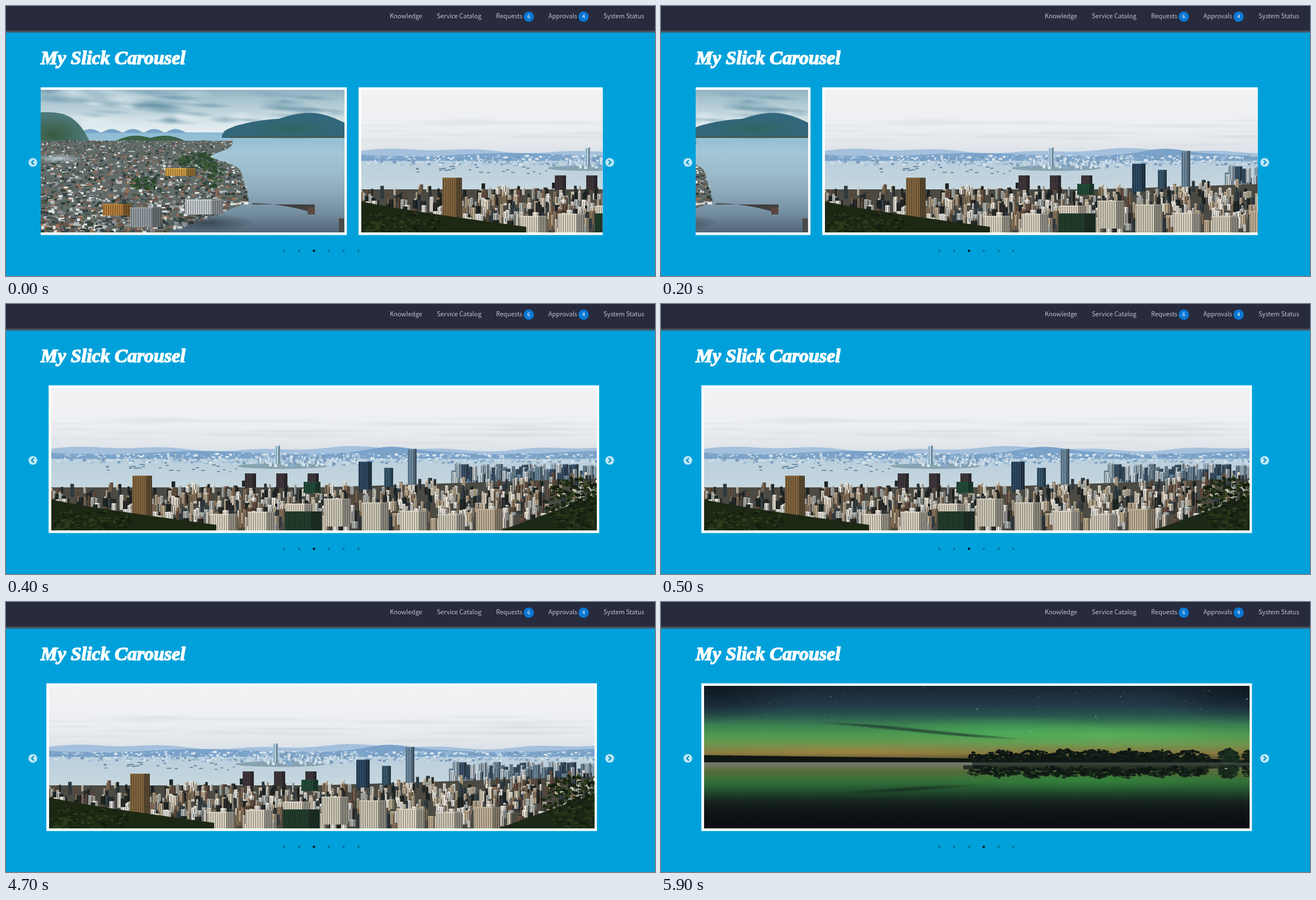
An HTML page with a canvas for the animation above (6.9 s loop, 1160 by 483 pixels).

```html
<!DOCTYPE html>
<html lang="en">
<head>
<meta charset="utf-8">
<title>My Slick Carousel</title>
<style>
  html, body { margin: 0; width: 100%; height: 100%; overflow: hidden; background: #00a1db; }
  canvas, svg { position: absolute; left: 0; top: 0; }
  .nav { font: 11.1px "Noto Sans CJK JP", "Noto Sans CJK SC", "Noto Sans CJK", sans-serif; fill: #c0c4cb; }
  .badge { font-size: 9.5px; fill: #fff; text-anchor: middle; }
  .title { font: italic bold 34px "Liberation Serif", serif; fill: #fff; stroke: #fff; stroke-width: 1.6; stroke-linejoin: round; }
</style>
</head>
<body>
<canvas id="stage" width="1160" height="483"></canvas>
<svg width="1160" height="483">
  <rect width="1160" height="44" fill="#272b3d"/>
  <rect y="44" width="1160" height="3.5" fill="#4a525e"/>
  <g class="nav">
    <text x="686" y="22">Knowledge</text>
    <text x="770" y="22">Service Catalog</text>
    <text x="876" y="22">Requests</text>
    <text x="969.5" y="22">Approvals</text>
    <text x="1068" y="22">System Status</text>
    <g fill="#0a78d4"><circle cx="934.4" cy="18.9" r="9.2"/><circle cx="1032.4" cy="18.9" r="9.2"/></g>
    <text class="badge" x="934.3" y="22">6</text>
    <text class="badge" x="1032.3" y="22">4</text>
  </g>
  <text class="title" x="62" y="104">My Slick Carousel</text>
  <g fill="#bfe8f6"><circle cx="48" cy="279.7" r="7.8"/><circle cx="1079" cy="279.7" r="7.8"/></g>
  <path d="M50 275.7l-4.2 4 4.2 4M1077 275.7l4.2 4-4.2 4" fill="none" stroke="#0f93c2" stroke-width="2.4"/>
  <g id="dots"></g>
  <path id="cursor" d="M12 35v14.4l3.4-3 2.4 5.2 2.6-1.2-2.4-5h4.2z" fill="#fff" stroke="#111" stroke-width="1.2"/>
</svg>
<script>
const LOOP = 6900, PITCH = 1005.2;
const { sin, cos, abs, max, sqrt, exp, PI } = Math;
let g, seed = 7;
const rand = (a = 0, b = 1) => {
  seed = (seed * 1664525 + 1013904223) % 4294967296;
  return a + (b - a) * seed / 4294967296;
};
const pick = list => list[Math.floor(rand(0, list.length))];
const repeat = (n, fn) => { for (let i = 0; i < n; i++) fn(i / n); };

// Photos are painted in the stage coordinates of a centred slide.
const LEFT = 77, TOP = 150, WIDTH = 975, HEIGHT = 255, RIGHT = LEFT + WIDTH, BOTTOM = TOP + HEIGHT;
function photo(paint) {
  const c = document.createElement('canvas');
  c.width = WIDTH;
  c.height = HEIGHT;
  g = c.getContext('2d');
  g.translate(-LEFT, -TOP);
  paint();
  return c;
}
function box(color, x, y, w, h) {
  g.fillStyle = color;
  g.fillRect(x, y, w, h);
}
function band(y0, y1, ...colors) {
  const fill = g.createLinearGradient(0, y0, 0, y1);
  colors.forEach((color, i) => fill.addColorStop(i / (colors.length - 1), color));
  box(fill, LEFT, y0, WIDTH, y1 - y0);
}
function ridge(color, x0, x1, base, top) {
  g.beginPath();
  g.moveTo(x0, base);
  for (let u = 0; u <= 1; u += 1 / 64) g.lineTo(x0 + (x1 - x0) * u, top(u));
  g.lineTo(x1, base);
  g.fillStyle = color;
  g.fill();
}
function oval(color, x, y, rx, ry) {
  g.fillStyle = color;
  g.beginPath();
  g.ellipse(x, y, rx, ry, 0, 0, 7);
  g.fill();
}
function glow(rgb, alpha, x, y, rx, ry, angle = 0) {
  g.save();
  g.translate(x, y);
  g.rotate(angle);
  g.scale(rx, ry);
  const fill = g.createRadialGradient(0, 0, 0, 0, 0, 1);
  fill.addColorStop(0, `rgba(${rgb},${alpha})`);
  fill.addColorStop(1, `rgba(${rgb},0)`);
  oval(fill, 0, 0, 1, 1);
  g.restore();
}
function foliage(n, x, y, rx, ry, colors) {
  repeat(n, () => {
    const a = rand(0, 2 * PI), d = sqrt(rand());
    oval(pick(colors), x + rx * d * cos(a), y + ry * d * sin(a), rand(2, 5), rand(1, 3));
  });
}
function tower(color, x, y, w, h) {
  box(color, x, y, w, h);
  box('rgba(15,18,20,.35)', x + w * .7, y, w * .3, h);
  for (let i = 1.5; i < w - 1; i += 4) box('rgba(20,20,20,.4)', x + i, y + 2, 1.5, h - 2);
}

const fjord = photo(() => {
  const SHIFT = 447;
  g.translate(SHIFT, 0);
  g.save();
  g.translate(-SHIFT, 0);
  band(150, 230, '#8fb2c2', '#abc6d1', '#bfd4dc', '#dce8ec', '#e6eff2');
  band(226, BOTTOM, '#8dbbd4', '#a3c6d7', '#9dbccc', '#8ca8b9', '#748fa1', '#526577');
  g.restore();
  repeat(60, () => glow(pick(['84,132,155', '238,245,247', '120,160,178']), .45,
    rand(62, 604), rand(150, 208), rand(18, 60), rand(4, 10), .06));
  ridge('#76a4c6', 132, 322, 227, u => 227 - 7 * abs(sin(5 * PI * u)));
  ridge('#33677b', 386, 640, 236, u => 231 - 30 * sqrt(sin(PI * u)) - 11 * max(0, sin(2 * PI * (u - .4))));
  glow('45,100,85', .6, 510, 220, 90, 20);
  box('#3f5b55', 400, 233, 204, 3);
  ridge('#4d7879', 62, 153, 254, u => 190 + 60 * u ** 3.5);
  glow('52,82,48', .8, 85, 230, 60, 35);
  ridge('#3b6046', 188, 328, 248, u => 245 - 9 * sin(PI * u) - 6 * abs(sin(2 * PI * u)));

  const shore = t => t < .66 ? 405 + 45 * t - 45 * exp(-(((t - .17) / .08) ** 2)) : 435 - 430 * (t - .66);
  repeat(HEIGHT, t => box('#626c69', 62, 241 + 164 * t, shore(t) - 62, 1.5));
  const walls = ['#e2e6e6', '#b4bbbd', '#8a9294', '#5c6467', '#36424a', '#96705a', '#6d554c', '#4c5a4c', '#2c3d35'];
  repeat(2400, i => {
    const t = i ** 1.2, size = .8 + 1.8 * i;
    box(pick(walls), rand(60, shore(t) - 3), 240 + 163 * t, size * rand(1.5, 4.5), size * rand(1, 2.8));
  });
  glow('190,211,221', .85, 92, 273, 50, 9);
  const leaves = ['#28442d', '#3c5a35', '#324c37'];
  foliage(90, 340, 276, 32, 14, leaves);
  foliage(50, 368, 302, 20, 22, leaves);
  foliage(50, 246, 317, 24, 12, leaves);
  tower('#d3a044', 284, 290, 55, 14);
  tower('#bb813b', 173, 354, 52, 21);
  tower('#c8d0d4', 320, 346, 68, 27);
  tower('#97a1a6', 222, 360, 56, 36);
  glow('33,40,50', .6, 360, 388, 85, 16);
  ridge('#41403f', 440, 552, 355, u => 353 + 18 * u * u);
  box('#5b4941', 539, 360, 13, 13);
  box('#49494a', 595, 380, 9, 25);
});

const harbour = photo(() => {
  band(150, 285, '#f0f2f3', '#eff1f3', '#eceef1', '#e2e6ea', '#c9d9e6');
  repeat(30, () => glow('205,211,219', .3, rand(LEFT, RIGHT), rand(202, 250), rand(60, 180), rand(2, 6)));
  ridge('#a4c0dc', LEFT, RIGHT, 282, u => 259 - 3 * sin(14 * u) - 2 * sin(37 * u));
  ridge('#7ba3ca', LEFT, RIGHT, 284, u => 266 + 3 * sin(17 * u) - 8 * exp(-(((u - .62) / .05) ** 2)));
  band(277, 345, '#b9cfdd', '#bfd2dd', '#c4d6de', '#cbd9df');
  const haze = ['#c8dae7', '#a3c0d8', '#88acce', '#dce7ee', '#7899b8'];
  repeat(700, () => box(pick(haze), rand(LEFT, RIGHT), rand(266, 283), rand(1.5, 7), rand(1, 4)));
  oval('#86a3af', 490, 290, 80, 5);
  repeat(180, () => box(pick(haze), rand(440, 625), rand(270, 286), rand(2, 6), rand(2, 7)));
  repeat(24, () => oval('#65879f', rand(150, 430), rand(286, 300), rand(2, 6), 1));
  tower('#b7dbef', 477, 253, 9, 34);
  repeat(130, () => tower(pick(['#6f8b9d', '#a5bbc8', '#3a536a', '#c7d3da']), rand(780, RIGHT), rand(285, 308), rand(5, 14), 26));

  const skyline = x => 320 - 16 * max(0, (x - 560) / (RIGHT - 560));
  ridge('#4b4a43', LEFT, RIGHT, BOTTOM, u => skyline(LEFT + WIDTH * u) + 8);
  const facades = ['#f3eee2', '#ddd2bf', '#c4b296', '#8f785e', '#ebe8e2', '#2b2d2c', '#37444a', '#b9beba', '#6b5243', '#1f2826'];
  repeat(900, depth => {
    const x = rand(LEFT - 4, RIGHT);
    tower(pick(facades), x, skyline(x) + 66 * depth + rand(-6, 9), rand(3, 7 + 7 * depth), rand(9, 22 + 20 * depth));
  });
  tower('#2d4a65', 626, 282, 24, 50);
  tower('#385a70', 672, 293, 16, 34);
  tower('#718fa5', 714, 259, 16, 64);
  for (let x = 423; x < 540; x += 56) tower('#40373d', x, 303, 20, 26);
  tower('#214d39', 528, 318, 30, 20);
  tower('#86683f', 222, 307, 35, 78);
  for (let x = 360; x < 900; x += 68) tower(pick(['#e0d8c6', '#c6b49a', '#d3cdbb']), x, 362 + 14 * sin(x), 48, 50);
  tower('#213e2c', 495, 371, 66, 34);
  const leaves = ['#17230f', '#223215', '#2d3d1d', '#141c10'];
  ridge('#1c2813', LEFT, 372, BOTTOM, u => 349 + 46 * u ** .85);
  foliage(160, 140, 387, 90, 20, leaves);
  ridge('#1d2918', 880, RIGHT, BOTTOM, u => 405 - 62 * u);
  foliage(320, 1015, 358, 55, 48, leaves);
});

const aurora = photo(() => {
  band(150, 288, '#18242f', '#1d303d', '#223a48', '#29524f', '#3a7d50', '#4d9750', '#6c9750', '#88793f', '#393a29');
  band(287, BOTTOM, '#777b69', '#546c38', '#327038', '#235030', '#17271f', '#101519', '#0e1016', '#0c0d13');
  glow('75,185,95', .5, 610, 232, 220, 28);
  glow('95,195,100', .5, 810, 238, 230, 24);
  glow('50,145,60', .5, 760, 318, 280, 20);
  glow('185,140,65', .4, 330, 267, 270, 14);
  for (const x of [LEFT, RIGHT]) glow('10,16,24', .7, x, 152, 180, 65);
  for (let x = 380; x < 600; x += 80) glow('28,48,44', .8, x, 222 + (x - 380) / 10, 110, 3.5, .07);
  glow('14,32,24', .7, 440, 335, 130, 5, -.06);
  repeat(200, i => {
    const size = rand(.5, 1.2) + (i > .94 ? 1 : 0);
    box(`rgba(205,225,238,${rand(.2, .75)})`, rand(LEFT, RIGHT), 150 + 85 * rand() ** 1.4, size, size);
  });

  const forest = () => {
    ridge('#0e1512', LEFT, 570, 287, u => 274 + 6 * u);
    ridge('#0f1714', 556, RIGHT, 291, u => 284 - 8 * sin(PI * u));
    for (let x = 562; x < 980; x += 11)
      foliage(20, x, 277 + 3 * sin(x / 9) - 3 * sin((x - 556) / 135), 12, 8, ['#101a15', '#14211a', '#0d1411']);
    foliage(120, 1014, 277, 17, 14, ['#15241a', '#1c3021']);
    foliage(30, 1048, 276, 10, 10, ['#15241a', '#101a15']);
  };
  g.save();
  g.globalAlpha = .7;
  g.translate(0, 579);
  g.scale(1, -1);
  g.beginPath();
  g.rect(540, 250, 512, 39);
  g.clip();
  forest();
  g.restore();
  forest();
  band(286, 293, 'rgba(105,115,110,.1)', 'rgba(112,122,116,.5)', 'rgba(105,115,110,0)');
  oval('#c9d9e0', 1010, 298, 3, .8);
});

// The CSS "ease" curve, cubic-bezier(.25, .1, .25, 1).
function ease(x) {
  if (x >= 1) return 1;
  let low = 0, high = 1, s;
  repeat(24, () => {
    s = (low + high) / 2;
    if (.75 * s * (1 - s) + s ** 3 < x) low = s; else high = s;
  });
  return .3 * s * (1 - s) ** 2 + 3 * s * s * (1 - s) + s ** 3;
}

const stage = document.getElementById('stage').getContext('2d');
const cursor = document.getElementById('cursor');
const dots = Array.from({ length: 6 }, (_, i) => {
  const dot = document.createElementNS('http://www.w3.org/2000/svg', 'circle');
  dot.setAttribute('cx', 497.5 + 26.45 * i);
  dot.setAttribute('cy', 438);
  dot.setAttribute('r', 2.3);
  return document.getElementById('dots').appendChild(dot);
});

function slide(image, x) {
  stage.fillStyle = '#fff';
  stage.fillRect(72.2 + x, 145.5, 984, 264.2);
  stage.drawImage(image, LEFT + x, TOP);
}
function draw(now) {
  const t = now % LOOP, last = t >= 5900;
  const step = max(0, Math.floor(t / 100) - 1);
  const offset = PITCH * (1 - ease(.2666 + .2167 * step));
  stage.clearRect(0, 0, 1160, 483);
  stage.save();
  stage.beginPath();
  stage.rect(62, 140, 1004.5, 280);
  stage.clip();
  if (last) slide(aurora, 0);
  else {
    slide(fjord, Math.round(offset - PITCH));
    slide(harbour, Math.round(offset));
  }
  stage.restore();
  dots.forEach((dot, i) => dot.setAttribute('fill-opacity', i === (last ? 3 : 2) ? .8 : .27));
  cursor.style.display = t >= 4300 && t < 4700 ? '' : 'none';
  requestAnimationFrame(draw);
}
requestAnimationFrame(draw);
</script>
</body>
</html>
```
